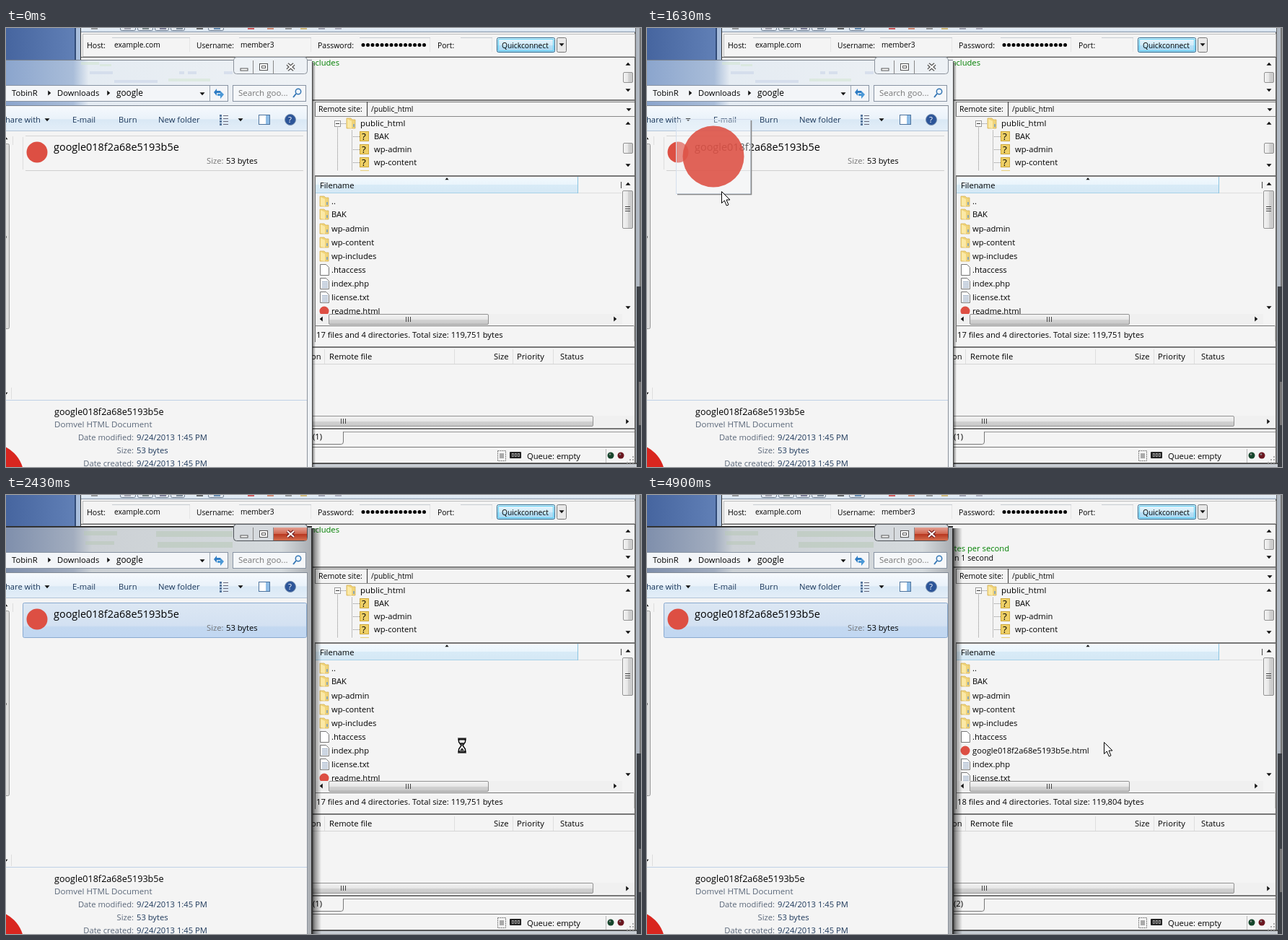
An HTML page that plays this animation: 880 by 608 pixels, repeating every 5230 ms.

```html
<!DOCTYPE html>
<html lang="en">
<head>
<meta charset="utf-8">
<title>Upload by drag and drop</title>
<style>
html, body { margin: 0; width: 100%; height: 100%; overflow: hidden; background: #f4f4f4; }
svg { display: block; width: 880px; height: 608px; }
text { font: 11.2px "Open Sans", "Noto Sans", sans-serif; white-space: pre; }
</style>
</head>
<body>
<svg id="stage" viewBox="0 0 880 608"></svg>
<script>
const LOOP = 5230;
const LOGO = '#dd4f43';
const PAPER = '#f4f4f4';

// Drawing helpers, each returning SVG markup
const rect = (x, y, w, h, fill, more = '') => `<rect x="${x}" y="${y}" width="${w}" height="${h}" fill="${fill}" ${more}/>`;
const box = (x, y, w, h, fill, stroke, more = '') => rect(x + .5, y + .5, w - 1, h - 1, fill, `stroke="${stroke}" ${more}`);
const path = (d, fill, stroke = 'none', more = '') => `<path d="${d}" fill="${fill}" stroke="${stroke}" ${more}/>`;
const disc = (x, y, r, fill = LOGO, more = '') => `<circle cx="${x}" cy="${y}" r="${r}" fill="${fill}" ${more}/>`;
const text = (x, middle, s, size = 11.2, fill = '#000', more = '') =>
  `<text x="${x}" y="${Math.round(middle + size * .36)}" style="font-size:${size}px" fill="${fill}" ${more}>${s}</text>`;
const group = (id, body, more = '') => `<g id="${id}" ${more}>${body}</g>`;
const arrow = (x, y, turn = 0, r = 3.5) =>
  path(`M${-r} ${-r / 2}H${r}L0 ${r / 2 + .5}z`, '#111', 'none', `transform="translate(${x} ${y}) rotate(${turn})"`);
const gradient = (id, colors, across = false) =>
  `<linearGradient id="${id}" x2="${across ? 1 : 0}" y2="${across ? 0 : 1}">` +
  colors.map(([at, c]) => `<stop offset="${at}" stop-color="${c}"/>`).join('') + '</linearGradient>';

const folder = (x, y) =>
  path(`M${x} ${y - 7}h6l2 2h4v12h-12z`, '#f0d47a', '#d3ad48', 'stroke-width=".7"') +
  path(`M${x + 1} ${y - 6}l6 3v10l-6-1z`, '#fbe9a6') + rect(x + 9, y + 1, 2, 4, '#8fa9b4');
const page = (x, y, lined) =>
  path(`M${x + .5} ${y - 7.5}h8l4 4v11h-12z`, '#fff', '#777') +
  (lined ? [-3, -1, 1, 3, 5].map(d => rect(x + 3, y + d, 8, 1, '#9aacc4')).join('') : '');
const unknown = (x, y) => box(x, y - 7, 13, 14, '#efd066', '#cfa93c') + text(x + 3, y, '?', 13.5, '#000', 'font-weight="800"');
const grip = (x, y, upright) =>
  [0, 3, 6].map(d => upright ? rect(x, y + d, 7, 1, '#444') : rect(x + d, y, 1, 7, '#444')).join('');
const thumb = (x, y, w, h, id) => box(x, y, w, h, `url(#${id})`, '#929292', 'rx="1.5"');

const fileIcons = { d: folder, p: page, l: (x, y) => page(x, y, true), c: (x, y) => disc(x + 6, y, 6.5) };
const fileList = rows => rows.map(([kind, name], i) => {
  const y = 240 + 19 * i - (i === 1 ? 1 : 0);
  return fileIcons[kind](435, y) + text(451, y, name);
}).join('');
const folders = [['d', '..'], ['d', 'BAK'], ['d', 'wp-admin'], ['d', 'wp-content'], ['d', 'wp-includes'], ['p', '.htaccess']];
const filesBefore = [...folders, ['l', 'index.php'], ['l', 'license.txt'], ['c', 'readme.html']];
const filesAfter = [...folders, ['c', 'google018f2a68e5193b5e.html'], ['l', 'index.php'], ['l', 'license.txt']];

const knobStops = [[0, '#f4f4f4'], [.5, '#e6e6e6'], [.55, '#d2d2d2'], [1, '#c7c7c7']];
const defs = '<defs>' +
  gradient('desktop', [[0, '#46659f'], [1, '#6382b8']], true) +
  gradient('strip', [[0, '#eaf1f9'], [1, '#cfdcea']]) +
  gradient('header', [[0, '#f1f8fd'], [.45, '#eaf5fc'], [.5, '#d8ebf7'], [1, '#d5e8f5']]) +
  gradient('knob', knobStops) +
  gradient('knobV', knobStops, true) +
  gradient('tools', [[0, '#f5f9fd'], [.5, '#eaf2fa'], [.55, '#d9e8f5'], [1, '#e3eef8']]) +
  gradient('button', [[0, '#e8f5fc'], [.5, '#d2ecfa'], [.55, '#b9e0f6'], [1, '#a7d5ef']]) +
  gradient('idle', [[0, '#8ba5cd'], [.22, '#a9bdd9'], [.27, '#e4ebf2'], [1, '#eff2f5']], true) +
  gradient('active', [[0, '#7f8fac'], [.22, '#a2adbf'], [.28, '#ccd1d5'], [.9, '#d5dadd'], [1, '#a9adb2']], true) +
  gradient('close', [[0, '#e3a093'], [.48, '#d0664f'], [.52, '#b83720'], [1, '#d36f4f']]) +
  gradient('hoverFill', [[0, '#eff5fb'], [1, '#dfebf8']]) +
  gradient('selectFill', [[0, '#dce7f3'], [.65, '#d3e1f2'], [.7, '#c3d8f0'], [1, '#c1d7f2']]) +
  gradient('shade', [[0, 'rgba(0,0,0,.75)'], [.3, 'rgba(0,0,0,.4)'], [1, 'rgba(0,0,0,0)']], true) +
  '<clipPath id="listClip"><path d="M429 229H853V396H429z"/></clipPath></defs>';

const quickBar =
  rect(104, 0, 768, 6, 'url(#strip)') + rect(104, 5, 768, 1, '#8795a8') +
  [[158, 22], [182, 22], [206, 20], [228, 20], [280, 22]].map(([x, w]) => box(x, -8, w, 12, '#e5ebf2', '#66768b', 'rx="2"')).join('') +
  [[118, '#777'], [164, '#8b8b9b'], [189, '#566'], [213, '#557'], [236, '#567'], [264, '#333'], [288, '#369'],
   [335, '#c22'], [362, '#c64'], [387, '#777'], [408, '#c9a74a'], [433, '#889'], [456, '#99a']]
    .map(([x, c]) => rect(x, 0, 9, 2, c, 'opacity=".7"')).join('') +
  box(106, 8, 766, 32, PAPER, '#bcbcbc') +
  [[147, 108], [323, 100], [490, 98], [630, 44]].map(([x, w]) => rect(x, 13, w, 1, '#c6cbd1') + rect(x + w - 1, 14, 1, 19, '#e5e5e5')).join('') +
  text(112, 24, 'Host:', 10.6) + text(150, 23, 'example.com', 10.2) + text(264, 24, 'Username:', 10.2) +
  text(325, 23, 'member3', 10.2) + text(432, 24, 'Password:', 10.5) + text(598, 24, 'Port:', 10.4) +
  Array.from({ length: 14 }, (_, i) => disc(495 + i * 6.5, 23.5, 2.5, '#000')).join('') +
  box(680, 13, 81, 21, 'url(#button)', '#2b6c91', 'rx="2"') + box(682, 15, 77, 17, 'none', '#5cd0f5') +
  text(687, 24, 'Quickconnect', 10.25) + box(763, 13, 14, 21, '#e8e8e8', '#777', 'rx="2"') + arrow(770, 23);

const remote =
  rect(104, 40, 768, 1, '#555') + rect(424, 99, 447, 2, '#777') +
  arrow(862, 50, 180) + arrow(862, 86) + thumb(855, 61, 14, 15, 'knobV') +
  rect(428, 102, 443, 1, '#777') + rect(428, 102, 1, 20, '#777') + rect(500, 102, 1, 20, '#333') + rect(428, 122, 443, 1, '#888') +
  text(433, 112, 'Remote site:', 10.5) + text(506, 112, '/public_html', 10.1) + arrow(863, 113) +
  path('M459.5 138V198M479.5 142V198M464 132.5H471M479 150.5H490M479 168.5H490M479 186.5H490', 'none', '#888', 'stroke-dasharray="1 1"') +
  box(455, 128, 9, 9, '#fff', '#999') + rect(457, 132, 5, 1, '#333') + folder(472, 132) + text(491, 132, 'public_html', 11.5) +
  ['BAK', 'wp-admin', 'wp-content'].map((s, i) => unknown(490, 150 + i * 18) + text(510, 150 + i * 18, s)).join('') +
  rect(491, 197, 12, 1, '#e7cf79') +
  arrow(862, 132, 180) + arrow(862, 190) + thumb(855, 159, 14, 15, 'knobV') +
  rect(428, 204, 443, 2, '#777') + rect(428, 205, 1, 230, '#777') +
  rect(429, 207, 363, 21, 'url(#header)') + rect(429, 228, 364, 1, '#a9d2e8') + rect(792, 206, 1, 23, '#8cc5e2') +
  rect(793, 228, 60, 1, '#ddd') + text(435, 218, 'Filename') + rect(852, 213, 1, 9, '#444') + arrow(611, 209, 180, 2.5) +
  group('before', fileList(filesBefore), 'clip-path="url(#listClip)"') +
  group('after', fileList(filesAfter), 'clip-path="url(#listClip)"') +
  arrow(862, 216, 180) + arrow(862, 387) + thumb(854, 225, 15, 53, 'knobV') + grip(858, 247, true) +
  rect(429, 396, 425, 15, '#f0f0f0') + arrow(437, 403, 90) + arrow(844, 403, -90) +
  thumb(447, 396, 222, 15, 'knob') + grip(554, 400) +
  rect(428, 412, 443, 1, '#777') + rect(870, 412, 1, 22, '#ccc') +
  `<text id="total" x="430" y="429"></text>`;

const queue =
  rect(424, 441, 447, 2, '#777') + text(423, 455, 'on') + text(448, 455, 'Remote file') + text(676, 455, 'Size') +
  text(708, 455, 'Priority') + text(768, 455, 'Status') +
  [441, 621, 702, 758].map(x => rect(x, 445, 1, 20, '#dedede')).join('') + rect(424, 465, 447, 1, '#d5d5d5') +
  group('transfer', text(448, 496, '/public_html/google018f2a68...') + text(683, 496, '53') + text(708, 496, 'Normal') +
    `<text id="status" x="768" y="500"></text>`) +
  rect(424, 537, 447, 15, '#f0f0f0') + thumb(410, 537, 404, 15, 'knob') + grip(464, 541) + arrow(861, 545, -90) +
  rect(424, 554, 447, 2, '#777') + rect(468, 559, 403, 1, '#999') +
  path('M420 576.5H464.5Q467.5 576.5 467.5 573V559', 'none', '#777') + `<text id="done" x="425" y="570"></text>` +
  rect(424, 580, 447, 1, '#777') +
  box(681, 585, 12, 15, '#f3f3f3', '#777', 'stroke-dasharray="2 1"') + rect(684, 589, 6, 7, '#aaa') +
  rect(698, 587, 16, 9, '#222', 'rx="1"') + [701, 705, 709].map(x => box(x, 589, 3, 5, '#222', '#ccc', 'stroke-width=".7"')).join('') +
  `<text id="pending" x="722" y="597"></text>` +
  rect(831, 583, 1, 19, '#bbb') +
  [[838, '#16462c'], [852, '#6b1720']].map(([x, c]) => disc(x, 592, 4.5, c) + disc(x - 1, 590.5, 1.2, '#8b8b8b')).join('') +
  [[868, 593], [868, 597], [864, 597], [868, 601], [864, 601], [860, 601]].map(([x, y]) => rect(x, y, 2, 2, '#aaa')).join('');

const desktop =
  rect(0, 0, 880, 608, PAPER) + rect(0, 0, 104, 46, 'url(#desktop)') +
  rect(95, 0, 2, 46, '#314a77') + rect(97, 0, 6, 46, '#a9bedb') + rect(103, 0, 1, 46, '#333') +
  rect(871, 0, 2, 604, '#666') + rect(873, 0, 5, 608, '#b0b8c2') + rect(878, 0, 2, 608, '#777') +
  rect(874, 358, 6, 250, '#3c4046') + rect(877, 490, 3, 60, '#777') +
  rect(424, 602, 450, 2, '#555') + rect(424, 604, 450, 4, '#c8cdd3');

const glassSmears = (color, rows) => rows.map(([x, y, w, h]) => rect(x, y, w, h, color, 'opacity=".55"')).join('');
const captionGlyphs =
  rect(325, 56, 10, 3, '#fff', 'stroke="#555"') + box(351, 49, 12, 10, '#fff', '#555') + box(354, 52, 6, 4, '#fff', '#555');
const cross = color => [[color, 4.5], ['#fff', 2]].map(([stroke, w]) =>
  path('M390 50l9 8m0-8l-9 8', 'none', stroke, `stroke-width="${w}"`)).join('');

const explorer =
  group('idleFrame',
    rect(424, 48, 5, 560, 'url(#shade)') +
    rect(0, 44, 424, 564, 'url(#idle)') + rect(0, 44, 424, 1, '#7a828c') + rect(424, 46, 1, 562, '#444') +
    glassSmears('#c8d3e8', [[116, 60, 32, 4], [240, 60, 7, 4], [252, 60, 12, 4], [302, 60, 12, 4], [150, 72, 60, 4]]) +
    glassSmears('#d4e6d2', [[104, 47, 25, 4], [130, 50, 16, 3], [225, 70, 58, 4]]) +
    box(315, 40, 103, 24, '#edf1f5', '#8b929b', 'rx="4"') + cross('#555')) +
  group('activeFrame',
    rect(424, 46, 13, 562, 'url(#shade)') + rect(0, 44, 424, 564, 'url(#active)') + rect(0, 43, 424, 2, '#333') + rect(423, 46, 2, 562, '#333') +
    glassSmears('#b9c9b8', [[108, 50, 46, 6], [208, 50, 106, 8], [110, 64, 40, 5], [210, 65, 104, 8]]) +
    box(315, 40, 103, 24, '#d6dade', '#4b4f55', 'rx="4"') + rect(371, 45, 46, 18, 'url(#close)') + cross('#722')) +
  rect(342, 45, 1, 18, '#888') + rect(370, 45, 1, 18, '#888') + captionGlyphs +
  box(-4, 79, 312, 23, '#f3f5f8', '#8793a3') + rect(282, 80, 1, 21, '#9aa4b1') +
  text(8, 90, 'TobinR', 11.2) + arrow(60, 90, -90) + text(71, 90, 'Downloads') + arrow(142, 90, -90) + text(153, 90, 'google', 11.8) + arrow(272, 91) +
  path('M288 89l4-5v3h5v3h-5v4z', '#2e7cc4') + path('M302 92l-5 6v-4h-4v-3h4v-4z', '#4b98d6') +
  box(314, 79, 102, 23, '#f5f7f9', '#8793a3') + text(322, 90, 'Search goo...', 11.5, '#777', 'font-style="italic"') +
  disc(405, 88, 3.7, '#eef5fb', 'stroke="#3677b5" stroke-width="1.5"') + path('M402 91l-4 5', 'none', '#3677b5', 'stroke-width="2"') +
  rect(0, 107, 418, 501, PAPER) + rect(0, 107, 418, 1, '#7d8896') + rect(417, 107, 1, 501, '#8b929b') +
  rect(0, 109, 417, 33, 'url(#tools)') + rect(0, 142, 417, 1, '#b3c4d8') +
  text(-1, 127, 'hare with', 11.2, '#1e395b') + arrow(57, 127) + text(92, 127, 'E-mail', 11.2, '#1e395b') +
  text(156, 127, 'Burn', 11.2, '#1e395b') + text(211, 127, 'New folder', 11.3, '#1e395b') +
  [121, 125, 129, 133].map(y => rect(296, y - 1, 3, 3, '#58779d') + rect(301, y, 7, 1, '#667')).join('') + arrow(325, 127) +
  box(350, 120, 16, 14, '#fff', '#4d739d') + rect(360, 121, 5, 12, '#8fbce5') +
  disc(394, 127, 7.5, '#2c5599', 'stroke="#7890b0"') + text(391, 127, '?', 11.5, '#fff', 'font-weight="bold"') +
  box(-6, 160, 11, 257, '#dcdcdc', '#999', 'rx="2"') + rect(9, 150, 1, 12, '#ddd') + rect(7, 498, 1, 16, '#ddd') +
  arrow(0, 153, 180, 2.5) + arrow(0, 506, 0, 2.5) + rect(0, 288, 1, 3, '#777') +
  rect(27, 149, 385, 1, '#d5d5d5') + rect(27, 197, 385, 1, '#cfcfcf') + rect(23, 151, 1, 45, '#ddd') +
  group('hover', box(23, 149, 394, 49, 'url(#hoverFill)', '#b8d2ee', 'rx="2"')) +
  group('selected', box(23, 149, 394, 49, 'url(#selectFill)', '#8aaad0', 'rx="2"')) +
  disc(43, 172, 14.5) + text(66, 165, 'google018f2a68e5193b5e', 14.45) +
  text(278, 184, 'Size:', 11.2, '#777') + text(305, 184, '53 bytes') +
  rect(0, 515, 417, 1, '#bfd0e6') + disc(-22, 622, 47, '#d9261f') +
  text(67, 531, 'google018f2a68e5193b5e', 12.6) + text(67, 549, 'Domvel HTML Document', 11.6, '#5a6779') +
  [['Date modified:', '9/24/2013 1:45 PM', 567], ['Size:', '53 bytes', 585], ['Date created:', '9/24/2013 1:45 PM', 603]]
    .map(([label, value, y]) => text(177, y, label, 11.2, '#5a6779', 'text-anchor="end"') + text(181, y, value, 11.2, '#1e395b')).join('');

const log =
  `<text id="logTop" x="462" y="52" text-anchor="end" fill="#008000">/public_html/wp-includes</text>` +
  `<text id="logRate" x="502" y="78" text-anchor="end" fill="#008000">53 bytes per second</text>` +
  `<text id="logLast" y="91" text-anchor="end" style="font-size:10.7px"></text>`;

const pointers =
  group('drag', box(-52, -52, 104, 104, '#f7f9fc', '#d5e0ee', 'fill-opacity=".35"') +
    path('M-50 52.5H52.5V-50', 'none', '#888', 'stroke-width="1.6"') + disc(0, 0, 42.5, LOGO, 'opacity=".88"')) +
  group('cursor', path('M.5 .5V16.5L4.3 13 7.3 20 10 18.8 7 12H12z', '#fff', '#000')) +
  group('hourglass', path('M-4.5 -9V-5L-1 0-4.5 5V9H4.5V5L1 0 4.5 -5V-9z', '#fff', '#000', 'stroke-width="1.4"') +
    path('M-6 -10H6M-6 10H6M-6 -8H6M-6 8H6', 'none', '#000', 'stroke-width="1.2"') +
    path('M-3 -4H3L0 0zM-3 7L0 3 3 7z', '#333'));

const stage = document.getElementById('stage');
stage.innerHTML = defs + desktop + quickBar + remote + queue + log + explorer + pointers;
const part = Object.fromEntries([...stage.querySelectorAll('g[id], text[id]')].map(node => [node.id, node]));

const show = (id, on) => part[id].style.display = on ? '' : 'none';
const write = (id, s) => part[id].textContent = s;
const place = (id, [x, y]) => part[id].setAttribute('transform', `translate(${Math.round(x)} ${Math.round(y)})`);

// Linear travel through [time, x, y] points
function along(points, t) {
  const next = points.findIndex(p => p[0] > t);
  if (next <= 0) return points.at(next).slice(1);
  const [t0, x0, y0] = points[next - 1], [t1, x1, y1] = points[next];
  const k = (t - t0) / (t1 - t0);
  return [x0 + (x1 - x0) * k, y0 + (y1 - y0) * k];
}
const cursorPath = [[170, 2, 300], [300, 10, 275], [430, 30, 225], [570, 42, 187], [630, 44, 179], [700, 45, 174],
  [1299, 45, 174], [1300, 48, 174], [1430, 51, 178], [1500, 61, 189], [1570, 79, 205], [1630, 103, 226], [1700, 150, 256],
  [1770, 215, 285], [1830, 283, 305], [1900, 323, 314], [1970, 394, 325], [2100, 510, 341], [2230, 601, 346],
  [2300, 616, 345], [2301, 633, 342]];
const hourglassPath = [[2300, 629, 351], [2370, 630, 350], [2430, 632, 347]];
const dragOffset = [[1570, -11, -48], [1630, -11, -48], [1830, -33, -48]];

function draw(now) {
  const t = now % LOOP;
  const since = from => t >= from;
  const during = (from, to) => t >= from && t < to;

  // The pointer moves fifteen times a second, on times rounded to 10 ms
  const beat = 200 / 3, shift = beat / 2;
  const tick = Math.round((Math.floor((t + 4 - shift) / beat) * beat + shift) / 10) * 10;
  const tip = along(cursorPath, tick);
  const [dx, dy] = along(dragOffset, tick);
  place('cursor', tip);
  place('drag', [tip[0] + dx, tip[1] + dy]);
  place('hourglass', along(hourglassPath, tick));
  show('cursor', during(170, 2300) || since(3030));
  show('hourglass', during(2300, 3030));
  show('drag', during(1570, 2300));

  show('hover', during(570, 1300));
  show('selected', during(1300, 1570) || since(2300));
  show('idleFrame', !since(2300));
  show('activeFrame', since(2300));

  show('logTop', !since(3030));
  show('logRate', since(4770));
  part.logLast.setAttribute('x', since(4770) ? 480 : 476);
  write('logLast', since(4770) ? 'transferred 53 bytes in 1 second' : during(4100, 4500) ? 'waiting for welcome message...' : '');

  show('transfer', during(3100, 4770));
  write('status', since(4570) ? 'Transferring' : 'Connecting');
  write('pending', during(3100, 4770) ? 'Queue: 53 B' : 'Queue: empty');
  write('done', since(4770) ? '(2)' : '(1)');
  show('before', !since(4900));
  show('after', since(4900));
  write('total', since(4900) ? '18 files and 4 directories. Total size: 119,804 bytes'
    : '17 files and 4 directories. Total size: 119,751 bytes');
}

const start = performance.now();
function loop() {
  draw(performance.now() - start);
  requestAnimationFrame(loop);
}
loop();
</script>
</body>
</html>
```
